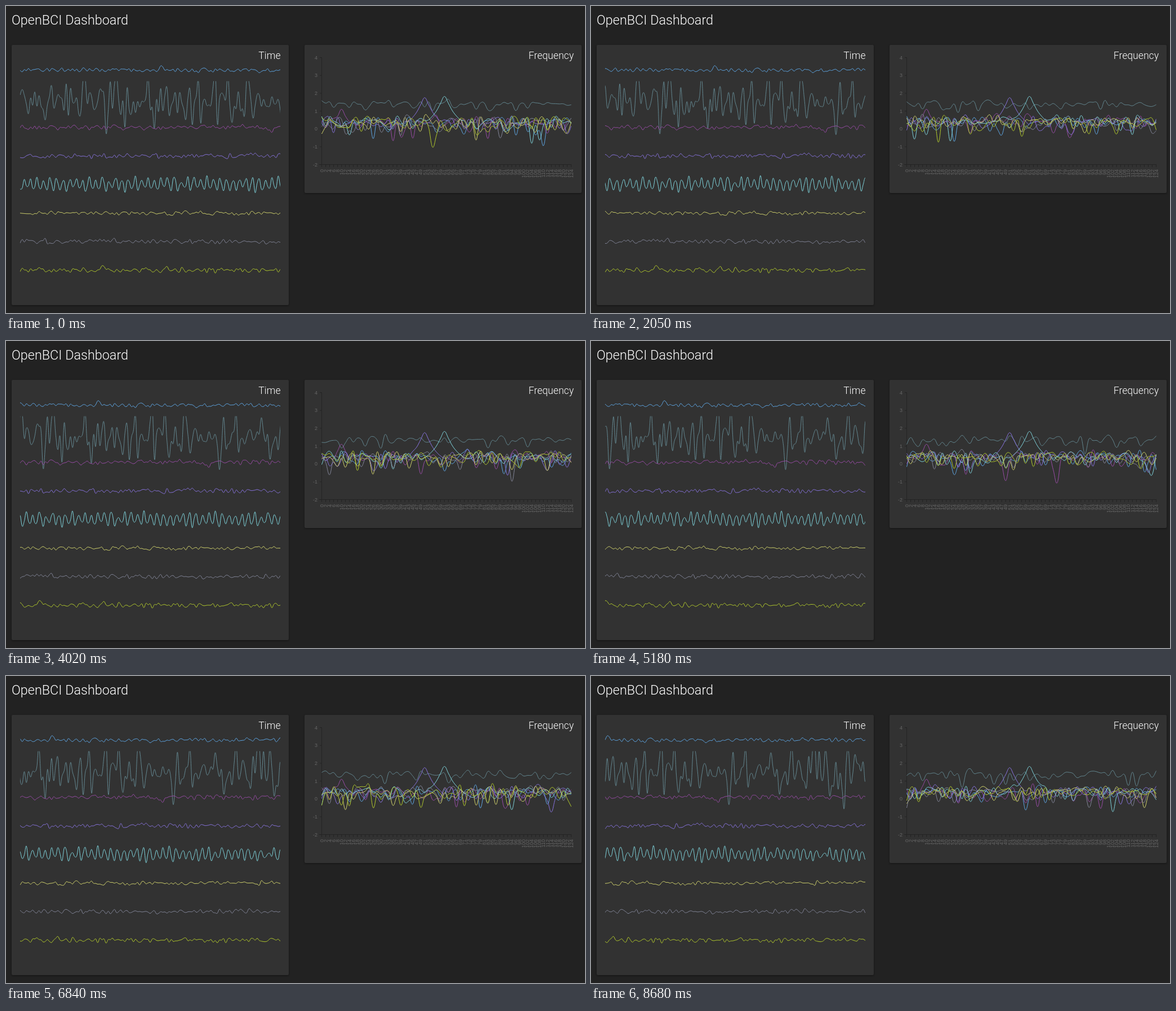
Write an HTML page that moves like this. It is 1028 px wide and 545 px high and loops after 8780 ms.

```html
<!DOCTYPE html>
<html lang="en">
<head>
<meta charset="utf-8">
<title>OpenBCI Dashboard</title>
<style>
  html, body { margin: 0; width: 100%; height: 100%; overflow: hidden; background: #222; }
  svg { display: block; }
  .panel { fill: #323232; filter: drop-shadow(0 1px 1.5px rgba(0, 0, 0, .45)); }
  .head { font-family: Roboto, sans-serif; font-weight: 300; fill: #fff; }
  .label { font: 9px "Liberation Sans", Arial, sans-serif; fill: #666; text-anchor: end; }
  .axis { stroke: #242424; fill: none; }
  .line { fill: none; stroke-width: 1; stroke-linejoin: round; }
</style>
</head>
<body>
<svg width="1028" height="545" viewBox="0 0 1028 545">
  <defs>
    <clipPath id="timeClip"><rect x="25" y="100" width="462" height="400"/></clipPath>
    <clipPath id="waveClip"><rect x="0" y="133.5" width="900" height="120"/></clipPath>
  </defs>
  <rect class="panel" x="10" y="69" width="492" height="462" rx="2"/>
  <rect class="panel" x="530" y="69" width="492" height="263" rx="2"/>
  <text class="head" x="10" y="33" font-size="23.4">OpenBCI Dashboard</text>
  <text class="head" x="487.5" y="94" font-size="17.6" text-anchor="end">Time</text>
  <text class="head" x="1008" y="94" font-size="17.6" text-anchor="end">Frequency</text>
  <g id="axes"></g>
  <g clip-path="url(#timeClip)"><g id="time"></g></g>
  <g id="freq"></g>
</svg>
<script>
const LOOP = 8780, SLOT = 166.6, PER_SLOT = 1.27;
const HELD = [2, 6, 13, 16, 20, 22, 25, 29, 35, 39, 40, 43, 44, 47]; // slots without a redraw
const GAP = 462 / 124, SAMPLES = 195, POINTS = 64, BIN = 443 / 63;
const STRONG = 1, MAINS = 4; // the clipped channel and the one full of hum

const CHANNELS = [
  { color: '#5fa8e6', spread: 1.7 },
  { color: '#638790', spread: 23 },
  { color: '#9a4ca8', spread: 2.2, tone: [5, 1.1] },
  { color: '#8974e0', spread: 2.1, tone: [26, 1.75] },
  { color: '#80d6de', spread: 3, tone: [31, 1.82] },
  { color: '#d4d66e', spread: 1.8 },
  { color: '#84879a', spread: 2.2 },
  { color: '#b4cc2c', spread: 2.2 }
];

// the most visible events: channel, x, offset
const SPIKES = [[0, 276, -9], [STRONG, 70, 38], [STRONG, 264, 54], [STRONG, 402, 44],
  [STRONG, 491, 64], [STRONG, 695, 71], [2, 472, 9], [7, 171, -8], [7, 285, -7]];

// mulberry32
function random(seed) {
  let s = seed * 7919 + 101 | 0;
  return () => {
    s = s + 0x6D2B79F5 | 0;
    let t = Math.imul(s ^ s >>> 15, 1 | s);
    t = t + Math.imul(t ^ t >>> 7, 61 | t) ^ t;
    return ((t ^ t >>> 14) >>> 0) / 4294967296;
  };
}

const f = n => n.toFixed(2);
const time = document.getElementById('time');
const freq = document.getElementById('freq');
const axes = document.getElementById('axes');

function add(parent, tag, attrs, text = '') {
  const el = document.createElementNS('http://www.w3.org/2000/svg', tag);
  for (const key in attrs) el.setAttribute(key, attrs[key]);
  el.textContent = text;
  return parent.appendChild(el);
}

function spline(pts) {
  const slope = i => {
    const a = pts[Math.max(i - 1, 0)], b = pts[Math.min(i + 1, pts.length - 1)];
    return [(b[0] - a[0]) * .2, (b[1] - a[1]) * .2];
  };
  return pts.reduce((d, p, i) => {
    if (!i) return `M${f(p[0])} ${f(p[1])}`;
    const q = pts[i - 1], m = slope(i - 1), n = slope(i);
    return d + `C${f(q[0] + m[0])} ${f(q[1] + m[1])} ${f(p[0] - n[0])} ${f(p[1] - n[1])} ${f(p[0])} ${f(p[1])}`;
  }, '');
}

function signal(ch) {
  const rnd = random(ch + 5), spikes = SPIKES.filter(s => s[0] === ch);
  return spline(Array.from({ length: SAMPLES }, (_, i) => {
    const x = 25 + i * GAP;
    let y = (rnd() + rnd() + rnd() - 1.5) * 2 * CHANNELS[ch].spread;
    if (ch === MAINS) y += 9.5 * Math.sin(x * 2 * Math.PI / 11.6);
    for (const [, at, dy] of spikes) y += (dy - y) * Math.exp(-(((x - at) / 3.6) ** 2));
    return [x, 114 + ch * 50.7 + y];
  }));
}

const freqY = v => 218.2 - v * 31.67;

// log magnitude of random noise, with a steady tone on some channels
function spectrum(ch, slot) {
  const rnd = random(slot * 8 + ch + 400), tone = CHANNELS[ch].tone;
  const [level, depth] = ch === STRONG ? [1.42, .33] : [.42, .5];
  return spline(Array.from({ length: POINTS }, (_, i) => {
    let v = level + depth * Math.log10(-Math.log(rnd() * .999 + .0005));
    if (tone) v = Math.max(v, tone[1] - .9 * Math.log10(1 + 1.7 * (i - tone[0]) ** 2));
    return [560.5 + i * BIN, freqY(v)];
  }));
}

function drawAxes() {
  let ticks = 'M560.5 91V285M556 281.5H1004';
  for (let v = -2; v <= 4; v++) {
    ticks += `M557 ${f(freqY(v))}H560`;
    add(axes, 'text', { class: 'label', x: 553, y: f(freqY(v) + 3.2) }, v);
  }
  for (let i = 0; i < POINTS; i++) {
    const x = 560.5 + i * BIN;
    ticks += `M${f(x)} 281V286`;
    add(axes, 'text', { class: 'label', transform: `translate(${f(x + 3.2)} 290) rotate(-90)` },
      Math.round(i * 124 / 63));
  }
  add(axes, 'path', { class: 'axis', d: ticks });
}

drawAxes();
const spectra = CHANNELS.map(({ color }, ch) => {
  const wave = add(time, 'path', { class: 'line', stroke: color, d: signal(ch) });
  if (ch === STRONG) wave.setAttribute('clip-path', 'url(#waveClip)');
  return add(freq, 'path', { class: 'line', stroke: color });
});

let shown = -1;
function draw(ms) {
  let slot = Math.floor(ms % LOOP / SLOT);
  while (HELD.includes(slot)) slot--;
  if (slot === shown) return;
  shown = slot;
  time.setAttribute('transform', `translate(${f(-Math.round(slot * PER_SLOT) * GAP)} 0)`);
  spectra.forEach((path, ch) => path.setAttribute('d', spectrum(ch, slot)));
}

const start = performance.now();
function tick() {
  draw(performance.now() - start);
  requestAnimationFrame(tick);
}
tick();
</script>
</body>
</html>
```
